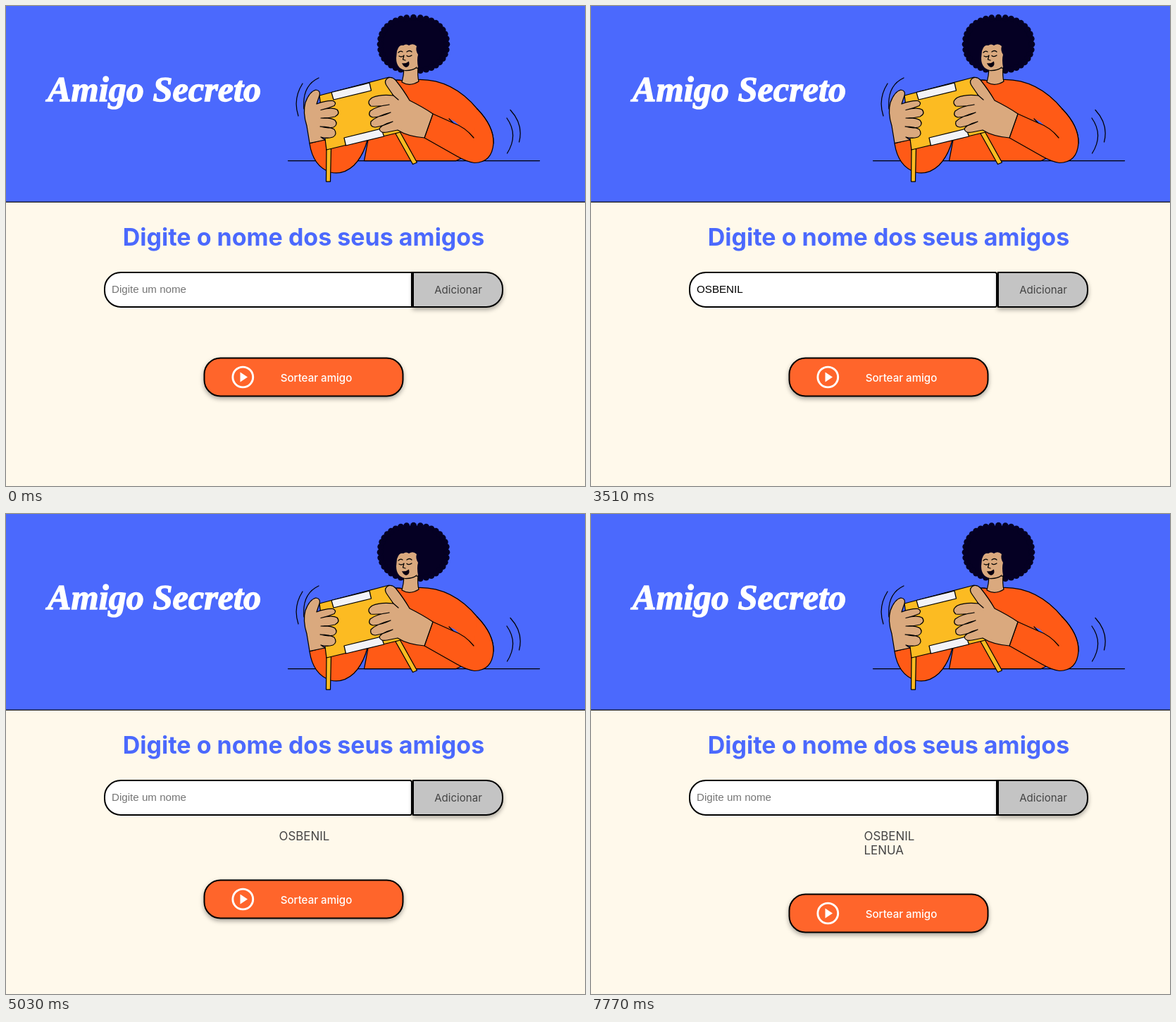
Animation of 822x681 px, one loop 8000 ms. Source, as an HTML page:

```html
<!DOCTYPE html>
<html lang="pt-BR">
<head>
<meta charset="utf-8">
<title>Amigo Secreto</title>
<style>
  html, body { margin: 0; width: 100%; height: 100%; overflow: hidden; background: #fff9eb; }
  svg { display: block; width: 822px; height: 681px; }
  text { font-family: Inter, "Open Sans", sans-serif; white-space: pre; }
  .title { font: italic 700 50.3px "Liberation Serif", "Noto Serif", serif; fill: #fff; stroke: #fff; stroke-width: 1.4; }
  .heading { font-size: 34px; font-weight: 700; fill: #4b69fd; }
  .field { font: 15.15px "Liberation Sans", Arial, sans-serif; }
  .label { font-size: 15.1px; fill: #444; }
  .friend { font-size: 16.9px; fill: #444; }
  .frame { stroke: #000; stroke-width: 2; }
  .raised { filter: drop-shadow(0 3px 3px rgba(0, 0, 0, .34)); }
  .art { stroke: #000; stroke-width: 1.25; stroke-linejoin: round; stroke-linecap: round; }
  .skin { fill: #daa97e; }
  .shirt { fill: #ff5a16; }
  .drum { fill: #fcbb22; }
  .paper { fill: #f3f3f8; }
  .hair { fill: #050023; stroke: none; }
  .line { fill: none; }
</style>
</head>
<body>
<svg viewBox="0 0 822 681">
  <rect width="822" height="681" fill="#fff9eb"/>
  <rect width="822" height="278" fill="#4b69fd"/>
  <rect y="277.5" width="822" height="1.2" fill="#000"/>
  <text class="title" x="59" y="135">Amigo Secreto</text>

  <g class="art">
    <path class="line" d="M400.5 219.5H757.5"/>
    <!-- motion marks -->
    <path class="line" d="M421 110Q407 132 415 156M444 102Q420 113 423 146M711 159Q728 183 711.500 209M716 147.500Q735 168 728.500 193"/>
    <!-- torso and far arm -->
    <path class="shirt" d="M548 106Q556 104 563 106L586 104.500Q634 104 669 146Q693 171 692 195L639 219.500H508.500L516 180Z"/>
    <path class="shirt" d="M431 195L451 190L513 190Q507 213 494 226Q479 240 461 236Q436 228 431 195Z"/>
    <!-- head -->
    <g id="hair" class="hair"></g>
    <path class="skin" d="M565 89L564 99Q563 104 562 108Q573 115 586 107Q584 99 585 88Z"/>
    <path class="skin" stroke="none" d="M555 64Q558 54 564 56Q568 53 572 56Q578 52 583 57Q581 63 585 69Q583 76 585 87Q579 91 571 91.500Q554 91 554 74Z"/>
    <path class="line" d="M566 91.500Q577 92 583 87M557 66Q560 63 563 65M569 65Q573 62 576 65M558 71Q561 73 564 71M569 70.500Q572 73 576 70M565 70L563.500 76L567 77"/>
    <path fill="#090010" stroke="none" d="M562 81Q568 82 572 78.500Q574 86 568 87Q564 86 562 81Z"/>
    <!-- near arm -->
    <path class="shirt" stroke="none" d="M606 153L630 162L664 187L669 146Q693 171 692 195Q690 222 665 222.500Q654 221 640 213L594 187Z"/>
    <path fill="#4b69fd" stroke="none" d="M629 160L637 163.500L643 169L634 166Z"/>
    <path class="line" d="M669 146Q693 171 692 195Q690 222 665 222.500Q654 221 640 213L594 187L606 153L635 166Q652 172 664 187M635 166L629 160"/>
    <!-- drum -->
    <path class="drum" d="M455 203L454.500 249H460.500L461.500 202ZM553 181L577.500 224.500L583.500 222L559 178Z"/>
    <path class="drum" d="M445 127L544 101L560 179L455 204Z"/>
    <path class="paper" d="M462 122.500L516 109L518.500 120L465 133ZM480 187L533 174L536.500 185L482.500 198Z"/>
    <!-- left hand -->
    <path class="skin" d="M431 194.500L427 170Q421 151 425 137Q431 121 440 119Q447 120 445 127L441 139Q454 134 464 134.500Q470 137 466 141.500Q458 145 447 147.500Q463 143 470 147Q475 153 467 157Q457 159.500 447 159Q461 158 467 162Q472 168 465 172Q456 174 446 171Q460 171 466 175Q471 182 464 186Q456 188.500 447 186L453 190Z"/>
    <!-- right hand -->
    <path class="skin" d="M606 153Q593 144 573 134Q565 120 553 105Q547 99 541 103Q536 107 541 114L550 127Q531 125 520 130Q511 136 518 142Q528 143 544 140Q526 142 517 149Q513 156 521 158Q534 157 546 151Q526 156 518 164Q516 171 524 172Q537 170 549 164Q534 168 530 174Q531 181 541 179L556 176Q570 185 594 187Z"/>
    <path class="line" d="M550 127L557 133"/>
  </g>

  <text class="heading" x="422.500" y="340" text-anchor="middle">Digite o nome dos seus amigos</text>

  <path id="box" class="frame" fill="#fff"/>
  <text id="value" class="field" x="150" y="407"></text>
  <rect id="caret" y="394" width="1" height="16"/>
  <g class="raised">
    <path id="add" class="frame" d="M578 378H682A23 23 0 0 1 705 401V404A23 23 0 0 1 682 427H578Z"/>
  </g>
  <text class="label" x="642" y="408" text-anchor="middle">Adicionar</text>

  <text class="friend" x="387.500" y="463"></text>
  <text class="friend" x="387.500" y="483"></text>

  <g id="draw">
    <rect class="frame raised" x="281.500" y="499.500" width="282" height="54" rx="23" fill="#ff652b"/>
    <circle cx="336.300" cy="526.500" r="14.400" fill="none" stroke="#fff" stroke-width="2.900"/>
    <path d="M332.500 519.500V533.500L343 526.500Z" fill="#fff"/>
    <text class="label" x="440.500" y="533" text-anchor="middle" style="fill:#fff;font-weight:500">Sortear amigo</text>
  </g>
</svg>
<script>
const LOOP = 8000, FIELD_X = 150;
const NAMES = ["OSBENIL", "LENUA"];
const $ = id => document.getElementById(id);
const friends = document.querySelectorAll(".friend");

function addShape(parent, tag, attrs) {
  const el = document.createElementNS("http://www.w3.org/2000/svg", tag);
  for (const key in attrs) el.setAttribute(key, attrs[key]);
  parent.append(el);
}

// Hair: a rounded outline with curls along it
const bulge = v => Math.sign(v) * Math.abs(v) ** 0.9;
const rim = Array.from({ length: 36 }, (_, i) => {
  const a = i / 36 * Math.PI * 2;
  return [578.5 + 47.2 * bulge(Math.cos(a)), 54.2 + 37.8 * bulge(Math.sin(a))];
});
addShape($("hair"), "polygon", { points: rim.join(" ") });
rim.forEach(([cx, cy]) => addShape($("hair"), "circle", { cx, cy, r: 4.6 }));

const steps = [];
let state = { text: "", caret: false, focus: false, hover: false, count: 0 };
const at = (t, change) => {
  state = { ...state, ...change, t };
  steps.push(state);
};
const type = (name, times) =>
  times.forEach((t, i) => at(t, { text: name.slice(0, i + 1), caret: true }));

at(0, {});
at(860, { focus: true, caret: true });
at(1380, { caret: false });
type(NAMES[0], [1910, 2050, 2320, 2580, 2650, 2780, 2980]);
at(3510, { caret: false });
at(3910, { hover: true });
at(4040, { focus: false });
at(4170, { text: "", count: 1 });
at(4370, { hover: false });
at(4500, { focus: true, caret: true });
at(5030, { caret: false });
at(5570, { caret: true });
type(NAMES[1], [5830, 6160, 6360, 6560, 6690]);
at(7230, { caret: false });
at(7300, { hover: true });
at(7570, { focus: false });
at(7640, { text: "", count: 2 });
at(7770, { hover: false });

const boxPath = r =>
  `M163 378H${576 - r}A${r} ${r} 0 0 1 576 ${378 + r}V${427 - r}A${r} ${r} 0 0 1 ${576 - r} 427` +
  "H163A23 23 0 0 1 140 404V401A23 23 0 0 1 163 378Z";

function show(s) {
  const value = $("value");
  value.textContent = s.text || "Digite um nome";
  value.setAttribute("fill", s.text ? "#000" : "#757575");
  const width = s.text ? value.getComputedTextLength() : 0;
  $("caret").setAttribute("x", FIELD_X + Math.round(width));
  $("caret").setAttribute("visibility", s.caret ? "visible" : "hidden");
  $("box").setAttribute("d", boxPath(s.focus ? 2.5 : 0));
  $("add").setAttribute("fill", s.hover ? "#a1a1a1" : "#c4c4c4");
  friends.forEach((f, i) => f.textContent = i < s.count ? NAMES[i] : "");
  $("draw").setAttribute("transform", `translate(0 ${s.count * 20})`);
}

let shown;
function tick() {
  const t = performance.now() % LOOP;
  const s = steps.findLast(step => step.t <= t);
  if (s !== shown) show(shown = s);
  requestAnimationFrame(tick);
}
tick();
</script>
</body>
</html>
```
